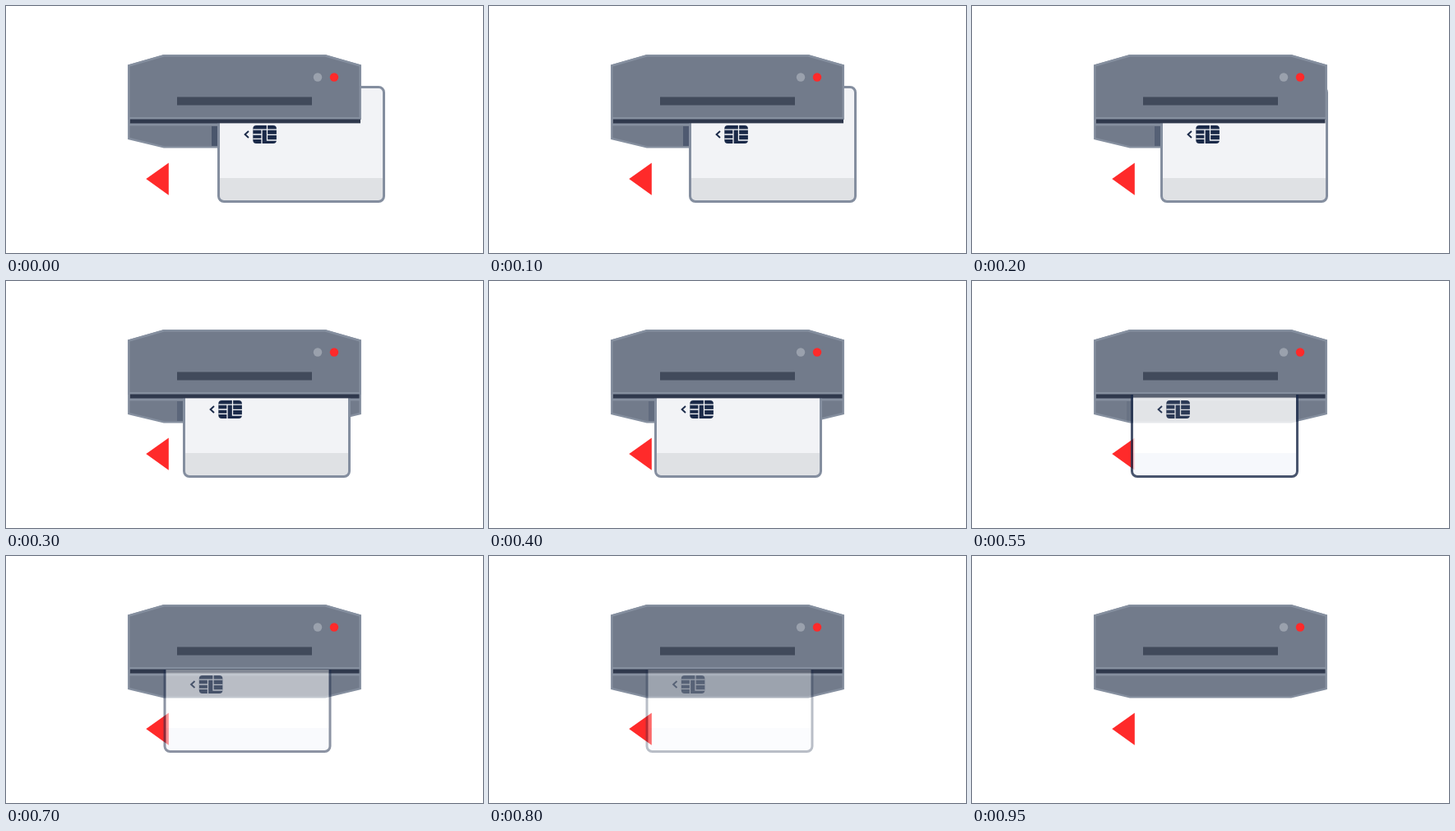
Recreate the animation shown at these times as an HTML page. Size 580 by 300 pixels, loop 1 s.

```html
<!DOCTYPE html>
<html lang="en">
<head>
<meta charset="utf-8">
<title>Card reader</title>
<style>
  html, body { margin: 0; width: 100%; height: 100%; overflow: hidden; background: #fff; }
  svg { display: block; width: 580px; height: 300px; }
</style>
</head>
<body>
<svg viewBox="0 0 580 300" xmlns="http://www.w3.org/2000/svg">
  <defs>
    <clipPath id="above"><path d="M0 0H580V138H0Z"/></clipPath>
    <clipPath id="below"><path d="M0 138H580V300H0Z"/></clipPath>
    <path id="body" d="M149.3 72.5L192 60.3H388L430.7 72.5V161L388 171.4H192L149.3 161Z"
      fill="#727b8b" stroke="#858f9f" stroke-width="2.4"/>
    <g id="chip">
      <path d="M38 152L33.6 156L38 160" fill="none" stroke="#1b2a49" stroke-width="1.9"/>
      <rect x="43.3" y="145" width="28.6" height="22" rx="4" fill="#1b2a49"/>
      <path d="M43.3 150.2H60.5M43.3 156H54M43.3 161.3H54M54 150.2V167M60.5 145V163H72M60.5 150.2H72M60.5 156.3H72"
        fill="none" stroke="#f4f5f7" stroke-width="1.3"/>
    </g>
  </defs>

  <rect width="580" height="300" fill="#fff"/>
  <path d="M170.3 210L197.8 190.5V229.7Z" fill="#ff2a2a"/>

  <use href="#body"/>
  <path d="M149 144.3H431" stroke="#858f9f" stroke-width="2.4"/>
  <rect id="shadow" y="146" height="24" fill="#1b2a49"/>

  <g id="slide">
    <rect x="1.5" y="98.5" width="201" height="139" rx="6.5" fill="#f2f3f6"/>
    <path d="M2 209H202V231Q202 237 196 237H8Q2 237 2 231Z" fill="#dfe1e4"/>
    <rect x="1.5" y="98.5" width="201" height="139" rx="6.5" fill="none" stroke="#848e9f" stroke-width="3"/>
    <use href="#chip"/>
  </g>

  <g clip-path="url(#above)">
    <use href="#body"/>
    <path d="M149 136.2H431" stroke="#858f9f" stroke-width="2.2"/>
  </g>
  <rect x="208" y="110.5" width="164" height="10" fill="#414a5b"/>
  <circle cx="379" cy="86.5" r="5.2" fill="#9aa1ad"/>
  <circle cx="399" cy="86.5" r="5.2" fill="#ff2a2a"/>
  <rect id="line" x="151" y="137.6" height="4.8" fill="#2f384c"/>

  <g clip-path="url(#below)">
    <g id="fade">
      <rect x="1.5" y="98.5" width="201" height="139" rx="6.5" fill="#fff"/>
      <path d="M2 209H202V231Q202 237 196 237H8Q2 237 2 231Z" fill="#f5f7fc"/>
      <rect x="1.5" y="98.5" width="201" height="139" rx="6.5" fill="none" stroke="#1b2a49" stroke-width="3"/>
      <use href="#chip"/>
      <rect id="lip" x="3" y="138" width="198" height="3.6" fill="#2f384c"/>
    </g>
  </g>
</svg>
<script>
  const STEP = 50, STEPS = 20, FADE_AT = 9;
  const $ = id => document.getElementById(id);
  const set = (id, attrs) => {
    for (const name in attrs) $(id).setAttribute(name, attrs[name]);
  };

  function draw(ms) {
    const k = Math.floor(ms / STEP) % STEPS;
    const fading = k >= FADE_AT;
    const left = fading ? 194 - (k - FADE_AT) / 2 : 257 - 7 * k;
    const place = `translate(${left} 0)`;

    set('slide', { transform: place, visibility: fading ? 'hidden' : 'visible' });
    set('fade', { transform: place, opacity: fading ? 1 - (k - FADE_AT) / 10 : 0 });
    set('lip', { opacity: k < 12 ? 0.75 : 0.2 });

    const edge = Math.max(left - 7, 188);
    set('shadow', {
      x: edge,
      width: Math.max(left + 1 - edge, 0),
      opacity: k < 12 ? 0.46 * (1 - k / 14) : 0
    });
    set('line', { width: k < 4 ? 280 : 278.5 });
  }

  function tick(now) {
    draw(now);
    requestAnimationFrame(tick);
  }
  draw(0);
  requestAnimationFrame(tick);
</script>
</body>
</html>
```
